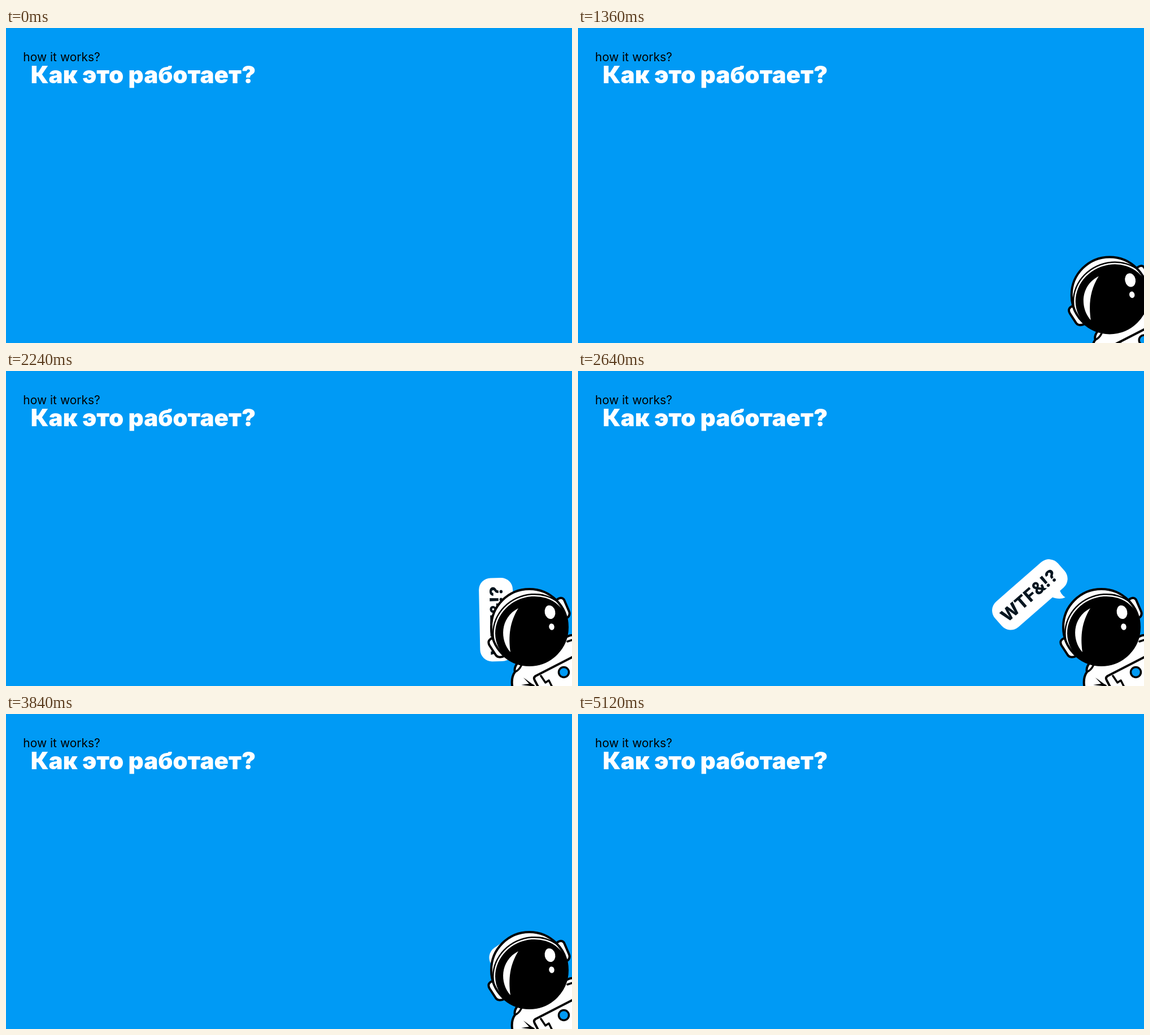
Animation, 1002 px wide and 559 px high, one loop 5.2 s. Source, as an HTML page:

```html
<!DOCTYPE html>
<html lang="ru">
<head>
<meta charset="utf-8">
<style>
  html, body { margin: 0; width: 100%; height: 100%; overflow: hidden; background: #009af5; }
  svg { display: block; width: 1002px; height: 559px; }
  text { font-family: Inter, sans-serif; }
  .ink { fill: #fff; stroke: #000; stroke-width: 4; stroke-linejoin: round; stroke-linecap: round; }
  .line { fill: none; stroke: #000; stroke-width: 3.5; stroke-linejoin: round; stroke-linecap: round; }
</style>
</head>
<body>
<svg viewBox="0 0 1002 559">
  <clipPath id="shell"><circle cx="926.5" cy="454.5" r="67.5"/></clipPath>

  <text x="30.3" y="59" font-size="21">how it works?</text>
  <text x="43.7" y="98" font-size="42" font-weight="900" fill="#fff">Как это работает?</text>

  <g id="bubble" fill="#fff">
    <rect x="-74" y="-30" width="148" height="60" rx="21"/>
    <path d="M26 28 Q33 42 44 45 Q41 36 46 27Z"/>
    <text x="-2" y="11.5" font-size="31" font-weight="800" text-anchor="middle" fill="#06151f">WTF&amp;!?</text>
  </g>

  <g id="astronaut">
    <!-- suit -->
    <path class="ink" d="M905 519 Q899 527 901 534 Q893 545 897 564 L1012 564 V470 Q998 466 990 474Z"/>
    <path class="line" d="M901 534 Q908 531 912 523 M994 480 Q1000 478 1006 476"/>
    <path d="M916 544 L931 555 Q936 557 937 560 L912 557 L926 555Z"/>
    <path class="ink" d="M1010 504 L938 541 Q933 544 936 549 L944 564 H1010Z"/>
    <path class="line" d="M947 541 L955 553 L961 549 L967 561"/>
    <circle class="ink" cx="987.5" cy="534.5" r="9" style="fill:#009af5;stroke-width:3.5"/>
    <!-- ear pieces -->
    <path class="ink" d="M974 407 Q983 399 988 406 L997 427 Q1000 435 990 440Z"/>
    <path class="ink" d="M861 474 Q851 478 856 487 L867 504 Q872 511 884 505Z"/>
    <!-- helmet -->
    <circle cx="926.5" cy="454.5" r="67.5" fill="#fff"/>
    <g clip-path="url(#shell)">
      <g transform="translate(931 461) rotate(-25)">
        <ellipse rx="71" ry="65"/>
        <ellipse rx="68.5" ry="62.5" fill="#fff"/>
        <ellipse rx="66" ry="60"/>
      </g>
    </g>
    <circle class="line" cx="926.5" cy="454.5" r="67.5" style="stroke-width:4"/>
    <g fill="#fff">
      <path d="M907 421 C874 438 874 478 893 499 C889 470 892 445 907 421Z"/>
      <ellipse rx="9.3" ry="12.2" transform="translate(963 428) rotate(-12)"/>
      <ellipse rx="4.7" ry="5.8" transform="translate(966 454) rotate(-12)"/>
    </g>
  </g>
</svg>
<script>
  const LOOP = 5200;
  const bubble = document.getElementById('bubble');
  const astronaut = document.getElementById('astronaut');

  // cubic-bezier(.25, .1, .25, 1), solved by bisection
  const bezier = (s, a, b) => 3 * a * s * (1 - s) ** 2 + 3 * b * s * s * (1 - s) + s ** 3;
  function ease(x) {
    if (x <= 0) return 0;
    if (x >= 1) return 1;
    let lo = 0, hi = 1;
    for (let i = 0; i < 24; i++) {
      const mid = (lo + hi) / 2;
      if (bezier(mid, .25, .25) < x) lo = mid; else hi = mid;
    }
    return bezier(lo, .1, 1);
  }

  const phase = (t, start, duration) => ease((t - start) / duration);
  const mix = (a, b, k) => a + (b - a) * k;

  function draw(t) {
    const away = 1 - phase(t, 570, 1200) + phase(t, 4260, 1200);
    astronaut.setAttribute('transform', `translate(${186 * away} ${245 * away})`);

    const tucked = 1 - phase(t, 2000, 900) + phase(t, 3240, 1000);
    bubble.setAttribute('visibility', t > 2000 && t < 4240 ? 'visible' : 'hidden');
    bubble.setAttribute('transform',
      `translate(${mix(792.5, 929.5, tucked)} ${mix(392, 481, tucked)}) rotate(${mix(-35.8, -136, tucked)})`);
  }

  function tick() {
    draw(performance.now() % LOOP);
    requestAnimationFrame(tick);
  }
  tick();
</script>
</body>
</html>
```
